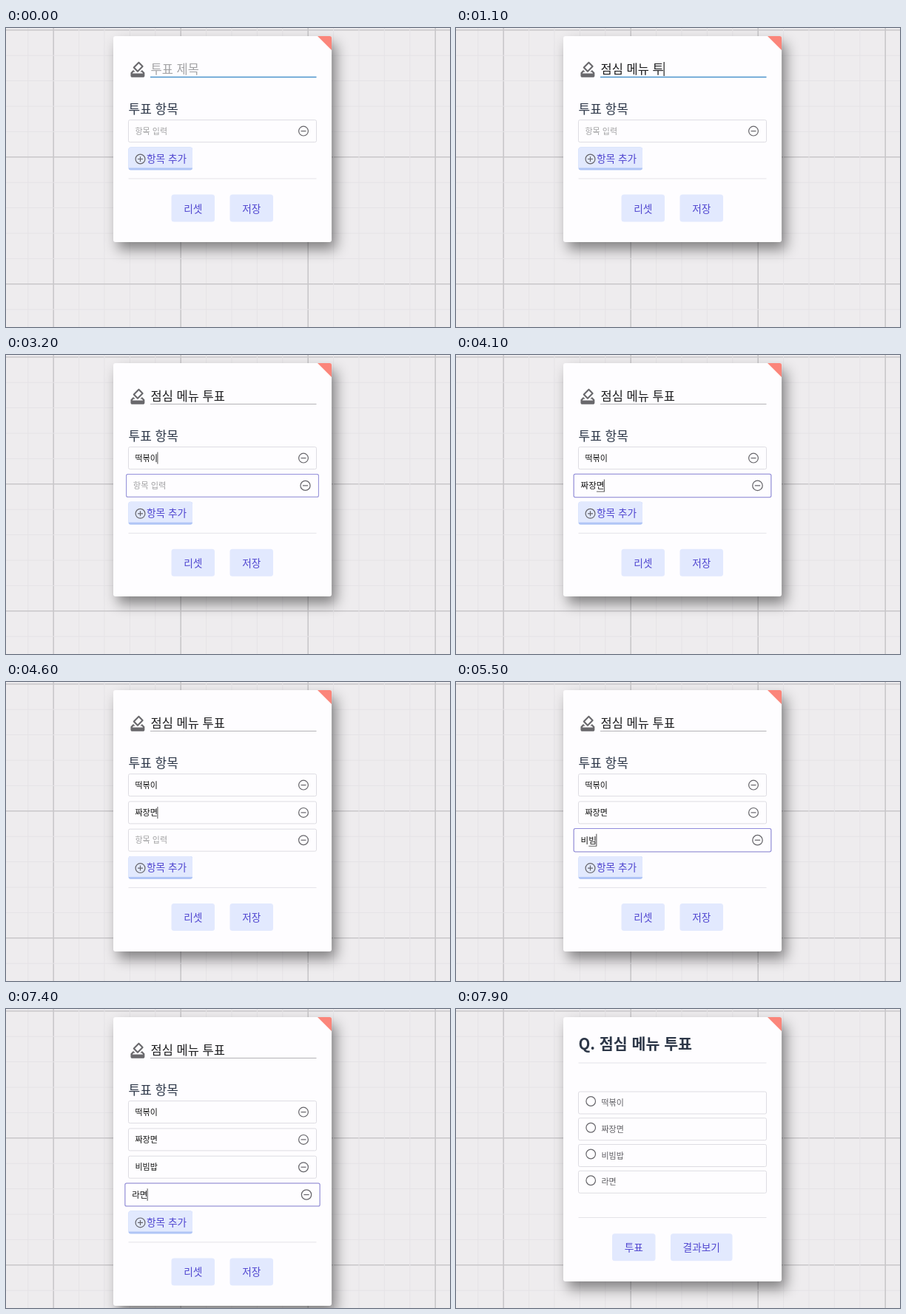
Write an HTML page that moves like this. It is 600 by 405 pixels and loops after 8 s.

```html
<!DOCTYPE html>
<html lang="ko">
<head>
<meta charset="utf-8">
<style>
html, body { margin: 0; width: 100%; height: 100%; overflow: hidden; }
body { position: relative; background: #eeecee; }
svg { position: absolute; left: 0; top: 0; width: 600px; height: 405px; }
#card {
  position: absolute; left: 145px; top: 11px; width: 295px; height: 279px;
  border-radius: 3px; background: #fefdff;
  box-shadow: 6px 10px 18px rgba(0, 0, 0, .45);
}
text { font-family: 'Noto Sans CJK KR', 'Noto Sans CJK', sans-serif; white-space: pre; }
.hint { fill: #a3a3a5; }
.btn { fill: #e2e9fe; }
.label { font-size: 13.7px; fill: #5046d0; }
.rule { stroke: #e4e3e8; }
.box { fill: #fefdff; stroke: #dddce2; }
.ring { fill: none; stroke: #908bdc; }
.icon { fill: none; stroke: #66656a; stroke-width: 1.2; }
.small { font-size: 11px; }
.caret { stroke: #222; stroke-width: 1.2; }
</style>
</head>
<body>
<svg id="grid"></svg>
<div id="card"></div>
<svg id="ui">
  <path d="M421 11H437.500Q440 11 440 13.500V30Z" fill="#fb857a"/>
  <g id="form">
    <path transform="translate(165.300 43.700) scale(1.050)" fill="#69686c" d="M18 13h-.68l-2 2h1.91L19 17H5l1.780-2h2.050l-2-2H6l-3 3v4c0 1.100.89 2 1.990 2H19c1.100 0 2-.89 2-2v-4zM17 7.950l-4.950 4.950-3.540-3.540 4.950-4.950zM12.760 2.290L6.390 8.660c-.39.39-.39 1.020 0 1.410l4.950 4.950c.39.39 1.020.39 1.410 0l6.360-6.360c.39-.39.39-1.020 0-1.410L14.160 2.300c-.38-.4-1.010-.4-1.400 0z"/>
    <text id="title" x="195.500" y="61.500" font-size="16.500"></text>
    <path id="titleCaret" class="caret"/>
    <path id="underline" d="M195 66.500H419.500"/>
    <text x="165.500" y="116" font-size="17" fill="#2d3748">투표 항목</text>
    <g id="items"></g>
    <g id="foot">
      <rect x="165.500" y="161.500" width="86.500" height="31" rx="3" fill="#b0c5f6"/>
      <path class="btn" d="M165.500 189.500V164.500Q165.500 161.500 168.500 161.500H249Q252 161.500 252 164.500V189.500Z"/>
      <circle class="icon" cx="181.500" cy="177.500" r="6.400"/>
      <path class="icon" d="M178 177.500h7M181.500 174v7"/>
      <text class="label" x="190" y="181.700">항목 추가</text>
      <path class="rule" d="M165.500 204H419.500"/>
    </g>
  </g>
  <g id="poll">
    <text x="165.500" y="55" font-size="20.600" font-weight="700" fill="#2d3748">Q. 점심 메뉴 투표</text>
    <path class="rule" d="M165.500 73H419.500M165.500 282.500H419.500"/>
  </g>
</svg>
<script>
const LOOP = 8000, ROW = 37.3, POLL_AT = 7700, TITLE_END = 1400;
const $ = id => document.getElementById(id);
const clamp = v => Math.max(0, Math.min(1, v));
const ease = v => (v = clamp(v), v * v * (3 - 2 * v));

function add(parent, tag, attrs, text = '') {
  const el = document.createElementNS('http://www.w3.org/2000/svg', tag);
  for (const k in attrs) el.setAttribute(k, attrs[k]);
  el.textContent = text;
  return parent.appendChild(el);
}

function button(parent, x, y, width, text) {
  add(parent, 'rect', { class: 'btn', x, y, width, height: 37, rx: 3.5 });
  add(parent, 'text', { class: 'label', x: x + width / 2, y: y + 24, 'text-anchor': 'middle' }, text);
}

// Every state a word passes through while its letters are typed
function strokes(word) {
  const initials = 'ㄱㄲㄴㄷㄸㄹㅁㅂㅃㅅㅆㅇㅈㅉㅊㅋㅌㅍㅎ';
  const out = [''];
  let done = '';
  for (const ch of word) {
    const code = ch.charCodeAt(0) - 0xac00;
    if (code >= 0) {
      out.push(done + initials[Math.floor(code / 588)]);
      if (code % 28) out.push(done + String.fromCharCode(0xac00 + code - code % 28));
    }
    out.push(done += ch);
  }
  return out;
}
const typed = (list, t, start, step) =>
  list[Math.max(0, Math.min(list.length - 1, Math.floor((t - start) / step) + 1))];

// Background grid: every fifth line is heavy
for (let i = -5; i < 20; i++) {
  const style = i % 5 ? { stroke: '#e5e3e6' } : { stroke: '#c9c7ca', 'stroke-width': 1.6 };
  const x = 64.2 + i * 34.4, y = 2.8 + i * 34.4;
  add($('grid'), 'path', { d: `M${x} 0V405M0 ${y}H600`, ...style });
}

button($('foot'), 223.5, 225.5, 58.5, '리셋');
button($('foot'), 302.5, 225.5, 58.5, '저장');
button($('poll'), 211, 304.3, 58.5, '투표');
button($('poll'), 290, 304.3, 83.5, '결과보기');

const items = [
  { word: '떡볶이', shown: 0, focus: 1400, type: 2200, step: 60, blur: 2900 },
  { word: '짜장면', shown: 3000, focus: 3130, type: 3500, step: 70, blur: 4300 },
  { word: '비빔밥', shown: 4500, focus: 4750, type: 5180, step: 75, blur: 5850 },
  { word: '라면', shown: 6100, focus: 6320, type: 6750, step: 90, blur: 7350 }
];

items.forEach((it, i) => {
  it.list = strokes(it.word);
  it.y = 139.6 + i * ROW;
  const g = it.g = add($('items'), 'g', {});
  const frame = { x: -127, y: -15, width: 254, height: 30, rx: 2 };
  add(g, 'rect', { class: 'box', ...frame });
  it.ring = add(g, 'rect', { class: 'ring', ...frame });
  it.hint = add(g, 'text', { class: 'small hint', x: -118, y: 4.2 }, '항목 입력');
  it.text = add(g, 'text', { class: 'small', x: -118, y: 4.2, fill: '#111' });
  add(g, 'circle', { class: 'icon', cx: 109.5, cy: 0, r: 6.4 });
  add(g, 'path', { class: 'icon', d: 'M106 0h7' });
  it.caret = add(g, 'path', { class: 'caret' });
  it.mark = add(g, 'path', { stroke: '#444', 'stroke-width': .8 });

  const y = 112 + i * 35.75;
  add($('poll'), 'rect', { class: 'box', x: 165.5, y, width: 254, height: 30, rx: 2 });
  add($('poll'), 'circle', { class: 'icon', cx: 182.2, cy: y + 13, r: 6.3 });
  add($('poll'), 'text', { class: 'small', x: 196.5, y: y + 19, fill: '#5f5e63' }, it.word);
});

const titleSteps = strokes('점심 메뉴 투표');

function drawTitle(t) {
  const s = typed(titleSteps, t, 100, 74);
  const title = $('title');
  title.textContent = s || '투표 제목';
  title.setAttribute('fill', s ? '#1c1c1e' : '#a3a3a5');
  const active = t < TITLE_END;
  const x = 196 + (s ? title.getComputedTextLength() : 0);
  $('titleCaret').setAttribute('d', active && s ? `M${x} 46V65` : '');
  $('underline').setAttribute('stroke', active ? '#4b93cc' : '#b4b3b7');
  $('underline').setAttribute('stroke-width', active ? 1.6 : 1);
}

function drawItem(it, t) {
  it.g.style.display = t >= it.shown ? '' : 'none';
  if (t < it.shown) return;
  const f = ease((t - it.focus) / 150) - ease((t - it.blur) / 150);
  it.g.setAttribute('transform', `translate(292.5 ${it.y}) scale(${1 + .05 * f})`);
  it.ring.style.opacity = clamp(f * 2);

  const s = typed(it.list, t, it.type, it.step);
  it.text.textContent = s;
  it.hint.style.display = s ? 'none' : '';
  const end = -118 + (s ? it.text.getComputedTextLength() : 0);
  const focused = t >= it.focus + 150 && t < it.blur;
  const caretOn = focused || t >= it.blur && t < it.blur + 350;
  it.caret.setAttribute('d', caretOn ? `M${end} -8V8` : '');
  it.caret.style.opacity = s ? .65 : 1;
  it.mark.setAttribute('d', focused && s ? `M${end - 10} 7.700H${end}` : '');
}

function draw(now) {
  const t = now % LOOP;
  const poll = t >= POLL_AT;
  $('form').style.display = poll ? 'none' : '';
  $('poll').style.display = poll ? '' : 'none';
  const extra = items.filter(it => t >= it.shown).length - 1;
  $('card').style.height = (poll ? 357.5 : 279 + extra * ROW) + 'px';
  if (!poll) {
    $('foot').setAttribute('transform', `translate(0 ${extra * ROW})`);
    drawTitle(t);
    items.forEach(it => drawItem(it, t));
  }
}

const start = performance.now();
function tick() {
  draw(performance.now() - start);
  requestAnimationFrame(tick);
}
tick();
</script>
</body>
</html>
```
